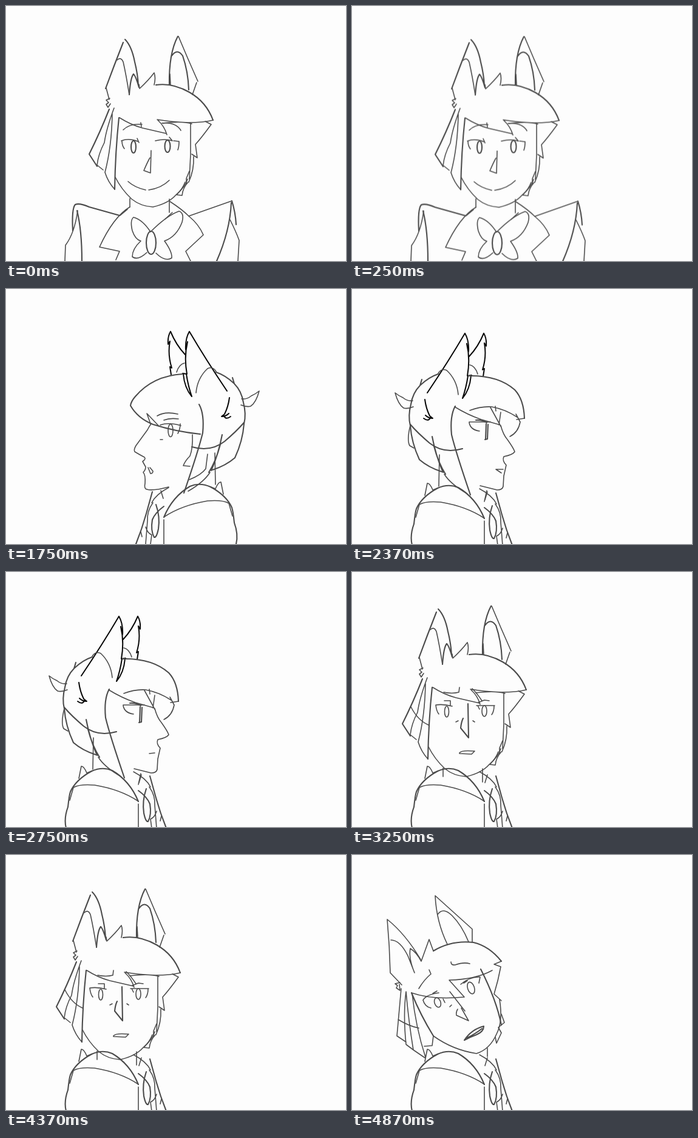
Animation, 560 px wide and 420 px high, one loop 5 s. Source, as an HTML page without scripts:

```html
<!DOCTYPE html>
<html lang="en">
<head>
<meta charset="utf-8">
<title>Head turn sketch</title>
<style>
html, body { margin: 0; width: 100%; height: 100%; overflow: hidden; background: #fdfdfd; }
svg { display: block; width: 100vw; height: 100vh; }
path, ellipse { fill: none; stroke: #4b4b4b; stroke-width: 1.6; stroke-linecap: round; stroke-linejoin: round; }
.bold { stroke-width: 2.1; }
.ink { stroke: #080808; stroke-width: 2; }

/* poses and mouths switch hard, nothing is tweened */
.s { opacity: 0; animation: 5s step-end infinite; }
.bob { animation: bob 5s step-end infinite; }
.front { animation-name: front; }
.left { animation-name: left; }
.right { animation-name: right; }
.back { animation-name: back; }
.tilt { animation-name: tilt; }
.turned { animation-name: turned; }
.look { animation-name: look; }
.blink { animation-name: blink; }
.frown { animation-name: frown; }
.calm { animation-name: calm; }
.l-wide { animation-name: l-wide; }
.l-shut { animation-name: l-shut; }
.l-soft { animation-name: l-soft; }
.r-wide { animation-name: r-wide; }
.r-half { animation-name: r-half; }
.r-shut { animation-name: r-shut; }
.b-open { animation-name: b-open; }
.b-half { animation-name: b-half; }
.b-shut { animation-name: b-shut; }
.t-half { animation-name: t-half; }
.t-open { animation-name: t-open; }

@keyframes bob { 0%, 7.4% { transform: none } 2.4% { transform: translateY(1px) } 5% { transform: translateY(.5px) } }
@keyframes front { 0% { opacity: 1 } 15% { opacity: 0 } }
@keyframes left { 15% { opacity: 1 } 45% { opacity: 0 } }
@keyframes right { 45% { opacity: 1 } 60% { opacity: 0 } }
@keyframes back { 60% { opacity: 1 } 90% { opacity: 0 } }
@keyframes tilt { 90%, 100% { opacity: 1 } }
@keyframes turned { 45%, 100% { opacity: 1 } }
@keyframes look { 0%, 5%, 100% { opacity: 1 } 2.4% { opacity: 0 } }
@keyframes blink { 2.4% { opacity: 1 } 5% { opacity: 0 } }
@keyframes frown { 15% { opacity: 1 } 27.4% { opacity: 0 } }
@keyframes calm { 27.4% { opacity: 1 } 45% { opacity: 0 } }
@keyframes l-wide { 15%, 20% { opacity: 1 } 17.4%, 22.4% { opacity: 0 } }
@keyframes l-shut { 17.4%, 22.4%, 30% { opacity: 1 } 20%, 27.4%, 35% { opacity: 0 } }
@keyframes l-soft { 27.4%, 35% { opacity: 1 } 30%, 45% { opacity: 0 } }
@keyframes r-wide { 45%, 50% { opacity: 1 } 47.4%, 52.4% { opacity: 0 } }
@keyframes r-half { 47.4%, 52.4% { opacity: 1 } 50%, 55% { opacity: 0 } }
@keyframes r-shut { 55% { opacity: 1 } 60% { opacity: 0 } }
@keyframes b-open { 60%, 65%, 72.4%, 77.4%, 87.4% { opacity: 1 } 62.4%, 67.4%, 75%, 80%, 90% { opacity: 0 } }
@keyframes b-half { 62.4%, 67.4%, 80% { opacity: 1 } 65%, 70%, 82.4% { opacity: 0 } }
@keyframes b-shut { 70%, 75%, 82.4% { opacity: 1 } 72.4%, 77.4%, 87.4% { opacity: 0 } }
@keyframes t-half { 92.4% { opacity: 1 } 95% { opacity: 0 } }
@keyframes t-open { 90%, 95%, 100% { opacity: 1 } 92.4% { opacity: 0 } }
</style>
</head>
<body>
<svg viewBox="0 0 560 420">
<defs>
  <!-- front hair, ears and jaw -->
  <g id="hair">
    <path class="bold" d="M164 136Q178 98 193 60M196 55Q207 66 212 92Q217 112 218 131M203 146Q205 118 210 112Q214 116 219 134"/>
    <path d="M183 89Q189 83 193 92Q198 114 203 146M165 135L170 154M171 152L165 155L169 159L165 162L168 167L172 161"/>
    <path d="M220 136Q235 122 244 110Q247 118 244 130M220 136L219 129"/>
    <path class="bold" d="M269 130Q268 78 283 50M273 82Q282 69 291 82Q300 108 301 138"/>
    <path d="M284 50Q299 86 316 124M314 126L307 146M270 112L271 130"/>
    <path class="bold" d="M247 130Q274 126 302 142Q330 158 341 188"/>
    <path d="M341 188Q326 192 300 192Q272 191 249 187M258 193Q290 189 306 194M187 184Q206 196 225 201L264 210M250 188Q261 198 265 212"/>
    <path d="M328 190L338 195Q322 217 312 228M312 228L315 250L306 244M304 194L304 245L302 285M309 248Q310 270 301 290"/>
    <path d="M302 272L297 284V294M300 290Q291 300 290 312L281 311Q291 301 295 290"/>
    <path class="bold" d="M170 170Q155 208 137 244L150 264M186 184Q180 240 179 302"/>
    <path d="M178 168Q165 203 162 225Q152 244 150 262L160 270M175 178Q174 232 163 274Q168 290 179 302"/>
    <path d="M180 282Q190 302 207 318Q222 330 242 331Q268 325 280 311Q296 297 299 285"/>
    <path d="M204 317L204 331M269 318V340"/>
  </g>

  <!-- ears and back hair seen from the side -->
  <g id="crown">
    <path class="ink" d="M271 70Q266 78 267 91L270 86Q266 108 273 130L270 128L272 141M271 70Q280 92 295 108"/>
    <path class="ink" d="M302 70Q295 82 296 100L299 87Q293 112 298 140L291 139M292 140Q294 163 306 177Q300 160 297 140M302 70Q329 116 364 168"/>
    <path class="ink" d="M368 179Q366 194 360 206L355 210Q362 210 367 205M359 209Q362 216 370 210"/>
    <path d="M281 137Q285 124 294 122M313 171Q315 147 332 131Q341 127 346 136"/>
    <path class="bold" d="M346 137Q361 142 375 155M373 146L376 156Q388 168 391 187Q396 206 392 222"/>
    <path d="M388 181Q397 182 404 176Q411 173 417 168Q412 187 403 193Q397 195 387 191"/>
    <path class="bold" d="M392 220Q380 234 360 251Q337 269 306 260M392 222Q390 250 377 278Q362 291 340 298"/>
    <path class="bold" d="M318 190Q327 206 324 237Q317 266 293 336M356 240Q350 272 338 299M353 256Q346 283 334 302"/>
    <path d="M336 302Q326 318 300 333M344 270L345 322"/>
  </g>

  <g id="coat">
    <path class="bold" d="M260 376Q274 342 303 325Q319 318 337 326Q363 340 372 360Q374 366 376 385Q383 404 379 420"/>
    <path d="M261 375Q290 356 332 349Q357 347 367 353L373 374M260 380V420M337 326L345 329Q350 317 354 318L358 338"/>
    <path class="bold" d="M241 334Q236 352 231 370Q224 395 214 420"/>
    <path d="M268 327Q247 338 240 352M255 332L259 345M242 352Q232 366 233 382L230 420M222 400L224 408M230 392Q233 402 240 405L238 420"/>
    <path class="bold" d="M247 355Q254 375 251 395Q248 410 244 409Q238 398 241 380Q246 368 260 358"/>
  </g>
</defs>

<g class="s front">
  <g class="bob">
    <use href="#hair"/>
    <path d="M193 204Q204 193 224 195M222 192L223 199M257 193Q280 191 288 205"/>
    <path d="M190 222Q202 217 217 223M216 218L219 225M246 222Q262 218 274 222L269 216M191 222Q191 230 195 235M276 222L285 223Q285 232 283 237"/>
    <g class="s look"><ellipse class="bold" cx="210" cy="232" rx="4" ry="10"/><ellipse class="bold" cx="266" cy="231" rx="4.5" ry="10"/></g>
    <path class="s blink" d="M193 232Q205 237 217 232M249 232Q263 237 282 232"/>
    <path d="M239 238L238 275L227 271Q233 257 237 250"/>
    <path d="M201 289Q212 299 230 303M235 303Q256 300 269 287"/>
    <path class="bold" d="M110 370Q108 334 114 327Q121 324 137 331L187 345M117 337Q125 370 125 420"/>
    <path d="M118 337Q113 374 98 394L97 420"/>
    <path d="M204 331Q177 347 154 397L187 404L181 418M270 322Q290 335 301 346Q318 360 325 377L296 404L304 420M274 340L262 351M188 345L200 335"/>
    <path d="M301 346L372 321M369 352Q379 372 384 386L382 420"/>
    <path class="bold" d="M372 321Q378 340 379 360M371 324Q369 370 347 420"/>
    <path d="M238 372Q225 352 210 348Q204 353 208 370Q213 385 222 387Q208 400 208 413Q217 420 232 406M238 372Q265 345 285 338Q294 341 290 356Q281 380 261 387Q274 405 273 415Q262 422 247 407"/>
    <ellipse class="bold" cx="239" cy="390" rx="8" ry="19"/>
  </g>
</g>

<g class="s left">
  <use href="#crown"/>
  <use href="#coat"/>
  <path class="bold" d="M291 140Q242 143 213 177Q206 185 205 192Q217 213 242 223Q280 235 320 239"/>
  <path d="M232 205L238 222M233 206L252 226M307 240Q308 262 303 275Q295 283 292 291L303 292M332 272L329 296Q322 306 302 314"/>
  <path d="M239 222Q236 226 233 232L214 258Q210 265 212 268Q222 274 228 277Q231 280 225 284L230 293Q230 298 226 302Q230 306 229 320Q227 329 232 330Q242 333 268 326"/>
  <g class="s frown">
    <path class="bold" d="M250 218Q262 207 284 212M254 224Q266 229 286 226"/>
    <path d="M258 215Q266 209 276 208M256 224L255 244M260 232L258 246M287 226L279 241"/>
  </g>
  <g class="s calm">
    <path d="M249 209Q262 201 283 206M260 216Q270 212 284 214M254 224Q268 219 288 225M287 222Q287 231 283 238"/>
    <ellipse cx="271" cy="233" rx="4" ry="10.5"/>
  </g>
  <path d="M254 248H258"/>
  <path class="s l-wide" d="M233 291L235 302L244 303Q244 297 236 294"/>
  <path class="s l-shut" d="M231 298L242 300"/>
  <path class="s l-soft" d="M234 294L238 304Q242 304 242 300L237 294"/>
</g>

<use class="s turned" href="#coat" transform="translate(478 2) scale(-1 1)"/>

<g class="s right">
  <use href="#crown" transform="translate(488 3) scale(-1 1)"/>
  <path class="bold" d="M192 143Q241 142 268 166Q283 182 284 213"/>
  <path d="M284 213L271 215M194 200Q212 193 230 194Q252 198 272 211M169 194Q190 207 213 215L241 223M228 195L245 226M245 203L242 224M236 193L237 201"/>
  <path d="M270 206L277 219Q274 236 260 243M96 225Q90 249 95 258L102 262"/>
  <path d="M245 225Q249 240 256 248Q266 262 268 268Q265 273 250 276Q247 283 254 290L250 308L249 325Q248 331 239 331L211 324M222 332L218 350"/>
  <path d="M193 220Q195 232 210 234M193 219H228"/>
  <path class="bold" d="M204 216Q214 215 222 220M221 222L220 247M224 223L223 247L219 248"/>
  <path class="s r-wide" d="M249 296L236 295Q235 304 247 306"/>
  <path class="s r-half" d="M249 297L237 297L246 303"/>
  <path class="s r-shut" d="M236 299L245 298"/>
</g>

<g class="s back">
  <use href="#hair" transform="translate(-54 6)"/>
  <path d="M97 222Q108 244 126 252M151 198Q165 201 176 198L177 190M198 192Q206 200 214 212"/>
  <path d="M138 219Q150 217 165 221M162 220V212L152 212M138 219Q139 229 143 234M205 220L235 220M208 215L218 211L226 212M234 220Q234 230 230 235M207 220L210 226"/>
  <path d="M171 247L175 245M199 245L202 247"/>
  <path class="bold" d="M191 217L192 273L179 257Q180 247 183 241"/>
  <g class="s b-shut">
    <ellipse cx="157.500" cy="230" rx="3.500" ry="8"/><ellipse cx="220" cy="229" rx="4" ry="8"/>
    <path d="M173 297H182M190 297H201"/>
  </g>
  <g class="s b-half">
    <ellipse cx="157" cy="230" rx="3.500" ry="8"/><ellipse cx="219" cy="229" rx="4" ry="8"/>
    <path d="M175 297Q188 294 201 297Q188 300 180 298"/>
  </g>
  <g class="s b-open">
    <ellipse cx="156" cy="230" rx="3.500" ry="9"/><ellipse cx="218" cy="229" rx="4" ry="9"/>
    <path d="M177 298Q180 293 202 295L197 300L177 299Z"/>
  </g>
</g>

<g class="s tilt">
  <path d="M82 214L63 194Q62 150 58 106Q88 130 113 172M64 140Q79 140 92 166L103 194Q93 170 96 154Q106 160 114 175L127 139L134 158"/>
  <path d="M79 210L71 212L75 215L73 219L79 223L78 213"/>
  <path d="M157 147Q139 110 137 67L198 122V143M141 98Q150 85 165 100Q181 116 192 143"/>
  <path class="bold" d="M134 158Q164 140 200 144Q226 150 246 175"/>
  <path d="M246 175L234 180L245 184Q241 206 234 229L246 240M243 238Q249 274 238 295Q227 320 205 327Q166 321 134 298"/>
  <path d="M81 220L74 298L89 308M89 225Q84 262 89 312L101 321M89 225Q93 272 101 321L120 334M99 228Q105 284 121 333M76 271Q94 282 110 285M119 315L132 314L134 298"/>
  <path class="bold" d="M98 227Q113 264 134 298M212 188Q238 239 246 280"/>
  <path d="M98 227Q132 239 185 234L160 206Q204 205 231 190M246 262L251 276L241 284L246 293L238 310L236 300M223 318V332"/>
  <path d="M110 220Q119 205 130 196L127 189M163 176Q163 182 170 181Q184 176 194 179"/>
  <path d="M143 227Q122 230 117 239Q120 250 130 252M140 224L133 228M179 213Q194 200 211 201L209 211M190 207L184 211M150 237L153 243"/>
  <ellipse cx="141" cy="243" rx="5" ry="8" transform="rotate(-20 141 243)"/>
  <ellipse cx="196" cy="219" rx="5.500" ry="10" transform="rotate(-18 196 219)"/>
  <path d="M161 225L186 257M180 252L192 273L172 264Q171 259 174 254M161 250L164 247"/>
  <path class="s t-half bold" d="M186 303Q202 293 216 285Q206 297 186 303"/>
  <path class="s t-open bold" d="M185 305Q197 287 217 282Q217 291 205 296Q194 300 185 305M190 301Q204 294 214 286"/>
</g>
</svg>
</body>
</html>
```
